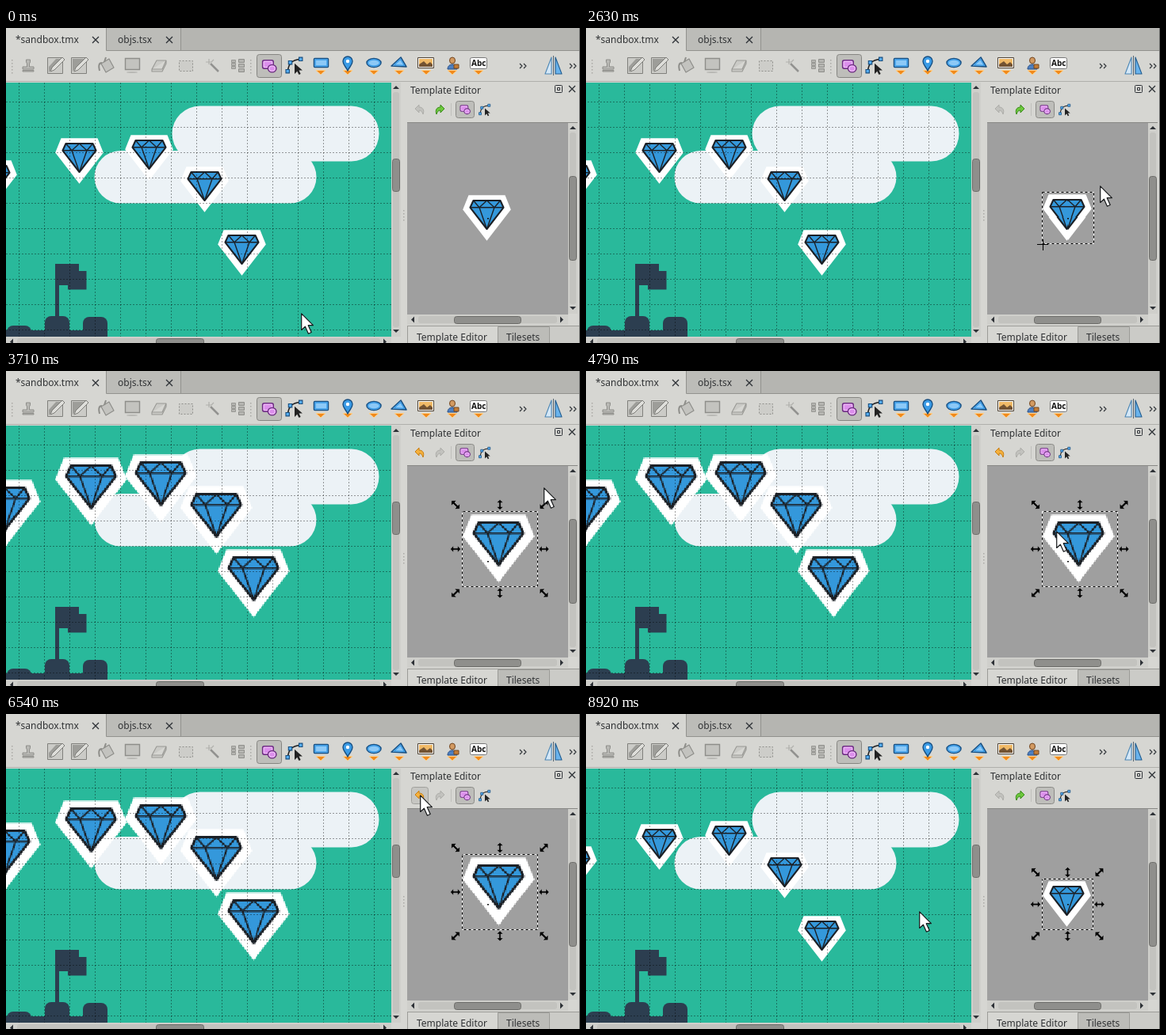
Animation of 724 by 398 pixels, one loop 8.96 s. Source, as an HTML page with a canvas:

```html
<!DOCTYPE html>
<html lang="en">
<head>
<meta charset="utf-8">
<title>Template Editor</title>
<style>
html, body { margin: 0; width: 100%; height: 100%; overflow: hidden; background: #d6d6d2; }
canvas { display: block; }
</style>
</head>
<body>
<canvas id="stage" width="724" height="398"></canvas>
<script>
const LOOP = 8960, HOVER = 980, SELECT = 1380, GRAB = 2540, RELEASE = 3540, UNDO = 7040;
const INK = '#2d3136', BLUE = '#3a9be6', SKY = '#8cc9f7', NAVY = '#174f82';
const ORANGE = '#f08a1d', PANEL = '#d6d6d2', GRAY = '#8e8e8a', EDGE = '#9b9b97';
const stage = document.getElementById('stage').getContext('2d');
let ctx = stage;

function shape(d, fill, stroke, width = 1, x = 0, y = 0) {
  const path = new Path2D(d);
  ctx.save();
  ctx.translate(x, y);
  ctx.lineWidth = width;
  ctx.lineJoin = 'round';
  if (fill) { ctx.fillStyle = fill; ctx.fill(path); }
  if (stroke) { ctx.strokeStyle = stroke; ctx.stroke(path); }
  ctx.restore();
}

function box(x, y, w, h, fill, stroke, radius = 0, width = 1) {
  ctx.beginPath();
  ctx.roundRect(x, y, w, h, radius);
  ctx.lineWidth = width;
  if (fill) { ctx.fillStyle = fill; ctx.fill(); }
  if (stroke) { ctx.strokeStyle = stroke; ctx.stroke(); }
}

function oval(x, y, rx, ry, fill, stroke, width = 1) {
  shape(`M${-rx} 0a${rx} ${ry} 0 1 1 ${2 * rx} 0a${rx} ${ry} 0 1 1 ${-2 * rx} 0Z`, fill, stroke, width, x, y);
}

function label(text, x, y, font = '12px "Noto Sans", sans-serif', color = '#303234') {
  ctx.font = font;
  ctx.fillStyle = color;
  ctx.fillText(text, x, y);
}

const cross = (x, y) => shape('M-4 -4L4 4M4 -4L-4 4', null, INK, 1.3, x, y);
const chevrons = x => shape('M-4 -3L-1 0 -4 3M1 -3L4 0 1 3', null, INK, 1.1, x, 48);

// The gem is a small bitmap, so enlarging it shows its pixels.
const gem = new OffscreenCanvas(64, 64);
ctx = gem.getContext('2d');
shape('M7.5 3.3H53.5L60.8 21.5 30.5 60.8 .2 21.5Z', '#fff');
shape('M13.5 10H47.5L51.5 18.8 30.5 46 9.5 18.8Z', '#3498db', '#1c2127', 2.1);
shape('M9.5 18.8H51.5M13.5 10L21 18.8 30.5 10 40 18.8 47.5 10M21 18.8L30.5 46 40 18.8', null, '#1c2127', 1.4);
ctx = stage;

function drawGem(x, bottom, size) {
  ctx.imageSmoothingEnabled = false;
  ctx.drawImage(gem, x, bottom - size, size, size);
}

function scrollbar(x, y, w, h, thumbStart, thumbLength) {
  box(x, y, w, h, '#cfcfcb');
  if (h > w) {
    box(x + 2, y + 12, w - 4, h - 24, '#c3c3bf', null, 3);
    box(x + 1.5, thumbStart + .5, w - 3, thumbLength, '#8f8f8c', '#6c6c69', 3);
    shape('M-4 2L0 -2 4 2Z', INK, null, 1, x + w / 2, y + 6);
    shape('M-4 -2L0 2 4 -2Z', INK, null, 1, x + w / 2, y + h - 7);
  } else {
    box(x + 14, y + 2, w - 28, h - 4, '#c3c3bf', null, 3);
    box(thumbStart + .5, y + 2.5, thumbLength, h - 4, '#8f8f8c', '#6c6c69', 3);
    shape('M2 -4L-2 0 2 4Z', INK, null, 1, x + 7, y + h / 2);
    shape('M-2 -4L2 0 -2 4Z', INK, null, 1, x + w - 8, y + h / 2);
  }
}

function selectIcon(x, y, s) {
  ctx.save();
  ctx.translate(x, y);
  ctx.scale(s, s);
  box(-8, -7, 13, 10, '#dc8fec', '#6c2f80', 2, 1.4);
  box(-6.5, -5.5, 10, 7, null, '#f0c3f8', 1);
  oval(3.5, 3, 5, 4.5, '#dc8fec', '#6c2f80', 1.4);
  oval(3.5, 3, 3.5, 3, null, '#f0c3f8');
  ctx.restore();
}

function nodeIcon(x, y, s) {
  ctx.save();
  ctx.translate(x, y);
  ctx.scale(s, s);
  shape('M-8 8C-7 -2 -4 -6 8 -7', null, '#222', 1.4);
  for (const [px, py] of [[-8, 7], [-5, -3], [7, -7]]) box(px - 2, py - 2, 4, 4, '#55aef5', '#174d7c');
  shape('M0 -2V10L3 7 5 11 7 10 5 6H9Z', '#222');
  ctx.restore();
}

function toolbar() {
  box(0, 0, 724, 68, PANEL);
  box(127, 0, 597, 28, '#b5b5b1');
  box(127, 0, 94, 28, '#bcbcb8');
  shape('M126.5 0V28.5H724M220.5 0V28', null, '#92928e');
  label('*sandbox.tmx', 12, 19);
  label('objs.tsx', 141, 19);
  cross(113, 15);
  cross(206, 15);
  for (const x of [7, 308]) for (let y = 40; y < 57; y += 4) box(x, y, 1.5, 1.5, '#aaa9a5');

  shape('M-2.5 -7H2.5V-4L1.5 -2V2H7V5H-7V2H-1.5V-2L-2.5 -4ZM-7 6.5H7V8H-7Z', '#b9b9b5', GRAY, 1, 28, 47);
  for (const x of [62, 92]) {
    box(x - 9.5, 37.5, 19, 20, '#cbcbc7', '#80807c');
    shape(x < 80 ? 'M-8 9V2L1 -8H8Z' : 'M-8 -8H8L-8 8Z', '#9d9d99', null, 1, x, 47);
    shape('M-6 8L-4 3 9 -10 12 -7 -1 6Z', '#dededa', '#7c7c78', 1, x, 47);
  }
  shape('M-7 -2L3 -8 9 3 -1 9Z', '#c3c3bf', GRAY, 1.2, 127, 47);
  shape('M-6 -3C-11 -3 -10 3 -9 7M-3 -4L-1 -10', null, GRAY, 2, 127, 47);
  box(150.5, 38.5, 18, 14, '#c3c3bf', GRAY, 0, 1.4);
  oval(159, 56, 7, 1, '#b8b8b4');
  shape('M-9 5L-3 -6H9L4 5ZM-9 5V8H4L9 -2V-6', '#cacac6', '#989894', 1.1, 193, 47);
  ctx.setLineDash([2, 2]);
  box(218.5, 41.5, 17, 13, '#cdcdc9', GRAY);
  ctx.setLineDash([]);
  shape('M-3 -3L7 7', null, '#929290', 2.5, 261, 48);
  shape('M-5 -9V-2M-9 -5H-1M1 -8L-2 -5', null, '#b0b0ac', 1.2, 261, 48);
  for (let i = 0; i < 3; i++) {
    box(293.5, 39.5 + i * 6, 7, 4, '#b5b5b1', GRAY);
    box(284.5, 40.5 + i * 4, 5, 3, '#b5b5b1', '#989894');
  }

  box(316.5, 33.5, 31, 29, '#bebeba', '#858581', 3);
  selectIcon(332, 48, 1.05);
  nodeIcon(364, 47, 1.1);
  for (const x of [397, 431, 464, 496, 530, 563, 596]) shape('M-6 -2H6L0 3.5Z', ORANGE, '#ffd08a', 1, x, 55.5);
  box(388.5, 38.5, 18, 11, SKY, NAVY, 1, 1.5);
  box(390, 40, 15, 8, null, BLUE, 0, 1.5);
  shape('M0 8C-2 3 -6 1 -6 -4A6 6 0 0 1 6 -4C6 1 2 3 0 8Z', BLUE, NAVY, 1.4, 431, 46);
  oval(431, 42, 2.2, 2.2, '#fff');
  oval(464, 44, 9, 5.5, SKY, NAVY, 1.5);
  oval(464, 44, 7.5, 4, null, BLUE, 1.5);
  shape('M-10 4L2 -7 9 5Z', SKY, NAVY, 1.5, 496, 44);
  shape('M-6 2.6L1.5 -4.5 6.5 3.4Z', null, BLUE, 1.4, 496, 44);
  box(519.5, 37.5, 20, 13, '#fff', '#4f4335');
  box(521, 39, 17, 10, '#f0b967');
  shape('M521 49V46L527 42 531 46 535 43 538 46V49Z', '#735333');
  oval(563, 41, 3.5, 4, '#d29a61', '#72451f');
  shape('M-6 6C-6 -2 6 -2 6 6Z', '#4d7fc0', '#294c82', 1, 563, 46);
  box(565, 46, 6, 5, '#c47c36', '#75471f');
  box(585.5, 37.5, 21, 14, '#fff', '#777', 2);
  label('Abc', 587, 48, 'bold 10px "Noto Sans", sans-serif', '#111');
  chevrons(652);
  chevrons(715);
  shape('M688 37V58H680Z', '#d3e7f7', '#4c86b4', 1.1);
  shape('M693 37V58H701Z', '#69b3ed', '#245f91', 1.1);
  shape('M690.5 35V60', null, '#56636e');
  shape('M0 67.5H724', null, '#b0b0ac');
}

function mapView(size) {
  ctx.save();
  ctx.beginPath();
  ctx.rect(0, 69, 486, 321);
  ctx.clip();
  box(0, 69, 486, 321, '#29b99b');
  box(209.5, 98.5, 261, 70, '#ecf2f6', null, 35);
  box(111.5, 155, 280, 66.5, '#ecf2f6', null, 33.2);
  shape('M62 298H92V307H101.5V330.5H78V325H67V370H62Z', '#2c3e50');
  for (const [x, y] of [[1, 376], [49, 364], [97, 365]]) box(x, y, 31, 40, '#2c3e50', null, 8);
  box(0, 382, 128, 8, '#2c3e50');
  for (const [x, y] of [[-47, 228], [62, 200], [150, 196], [220, 236], [267, 316]]) drawGem(x, y, size);
  ctx.setLineDash([2, 2]);
  let grid = '';
  for (let x = 16.5; x < 486; x += 32) grid += `M${x} 69V390`;
  for (let y = 93.5; y < 390; y += 32) grid += `M0 ${y}H486`;
  shape(grid, null, 'rgba(0,0,0,.38)');
  ctx.restore();
  scrollbar(486, 69, 12, 321, 165, 41);
  scrollbar(0, 390, 486, 13, 189, 60);
}

function historyArrow(x, enabled, color, edge, flip) {
  ctx.save();
  ctx.translate(x, 103);
  ctx.scale(flip, 1);
  shape('M-6 -1L-1 -6V-3C4 -3 6 1 4 6C3 3 2 1 -1 1V4Z', enabled ? color : '#c2c2be', enabled ? edge : '#adada9');
  ctx.restore();
}

function dock(t, canUndo) {
  box(498, 69, 226, 329, PANEL);
  for (let y = 230; y < 246; y += 4) box(501, y, 1.5, 1.5, '#aaa9a5');
  label('Template Editor', 510, 83);
  box(692.5, 72.5, 9, 9, null, INK, 1);
  box(695.5, 75.5, 3, 3, null, INK);
  cross(714, 77);
  if (t > 6250 && t < UNDO) box(511.5, 92.5, 21, 21, t > 6420 && t < 6600 ? '#c6c6c2' : '#e2e2de', '#a0a09c', 3);
  historyArrow(522, canUndo, '#f5b13d', '#c77d10', 1);
  historyArrow(547, !canUndo, '#6cc83c', '#3a8a1c', -1);
  shape('M561.5 95V111', null, '#c0c0bc');
  box(567.5, 92.5, 23, 21, '#bebeba', '#8a8a86', 3);
  selectIcon(579, 103, .75);
  nodeIcon(604, 103, .75);
  box(506, 119, 203, 243, '#9f9f9f');
  shape('M506 119.5H721', null, '#898986');
  scrollbar(709, 120, 12, 241, 187, 106);
  scrollbar(506, 362, 203, 13, 565, 84);
  shape('M506 376.5H724', null, EDGE);
  box(620.5, 377.5, 65, 24, '#bcbcb8', EDGE);
  box(686, 377, 38, 21, '#cbcbc7');
  shape('M506.5 398V377', null, EDGE);
  label('Template Editor', 518, 395);
  label('Tilesets', 631, 395);
  shape('M723.5 0V398', null, '#6a6b6a');
}

function handle(x, y, angle) {
  ctx.save();
  ctx.translate(x, y);
  ctx.rotate(angle * Math.PI / 4);
  const s = angle % 2 ? 1.15 : 1;
  ctx.scale(s, s);
  shape('M-6.5 0L-2.5 -4.2V-1.2H2.5V-4.2L6.5 0 2.5 4.2V1.2H-2.5V4.2Z', '#000', '#bbb', .5);
  ctx.restore();
}

function selection(t, size) {
  const left = 575.5, bottom = 272.5, right = left + size, top = bottom - size;
  box(left, top, size, size, null, '#fff');
  ctx.setLineDash([3, 3]);
  ctx.lineDashOffset = -Math.floor(t / 85);
  box(left, top, size, size, null, '#000');
  ctx.setLineDash([]);
  if (t >= GRAB && t < RELEASE) shape('M569 273.5H583M576.5 267V281', null, '#000');
  else if (t >= SELECT) {
    const x = [left - 8.5, (left + right) / 2, right + 8], y = [top - 8.5, (top + bottom) / 2, bottom + 8];
    [[0, 0, 1], [1, 0, 2], [2, 0, 3], [0, 1, 0], [2, 1, 0], [0, 2, 3], [1, 2, 2], [2, 2, 1]]
      .forEach(([i, j, angle]) => handle(x[i], y[j], angle));
  }
}

// Pointer moves: start, end, target x and y, optional bend point.
const MOVES = [
  [380, 1000, 602, 230],
  [1560, 2200, 647, 200],
  [2560, 3420, 678, 147, 660.5, 161.6],
  [4540, 5080, 487, 271],
  [5490, 5990, 522, 102, 534, 180],
  [7430, 8000, 420, 249],
];

function pointer(t) {
  let x = 372, y = 360;
  for (const [start, end, tx, ty, bx = (x + tx) / 2, by = (y + ty) / 2] of MOVES) {
    if (t < start) break;
    const p = Math.min(1, (t - start) / (end - start)), u = p * p * (3 - 2 * p);
    const bend = (a, b, c) => (1 - u) ** 2 * a + 2 * u * (1 - u) * b + u * u * c;
    x = bend(x, bx, tx);
    y = bend(y, by, ty);
  }
  return [Math.round(x), Math.round(y)];
}

function draw(t) {
  const [x, y] = pointer(t), changed = t >= RELEASE && t < UNDO;
  const dragged = t >= GRAB && t < RELEASE ? 64 + Math.max(0, x - 647) : changed ? 95 : 64;
  toolbar();
  mapView(changed ? 95 : 64);
  dock(t, changed);
  drawGem(576, 272, dragged);
  box(607, 240, 2, 1.5, '#111');
  if (t >= HOVER) selection(t, dragged);
  shape('M.7 .8V21.5L5.4 17.2 9.4 26.2 13.2 24.5 9.2 15.7H15.4Z', '#fff', '#16181a', 1.2, x, y);
}

function frame(now) {
  draw(now % LOOP);
  requestAnimationFrame(frame);
}
requestAnimationFrame(frame);
</script>
</body>
</html>
```
